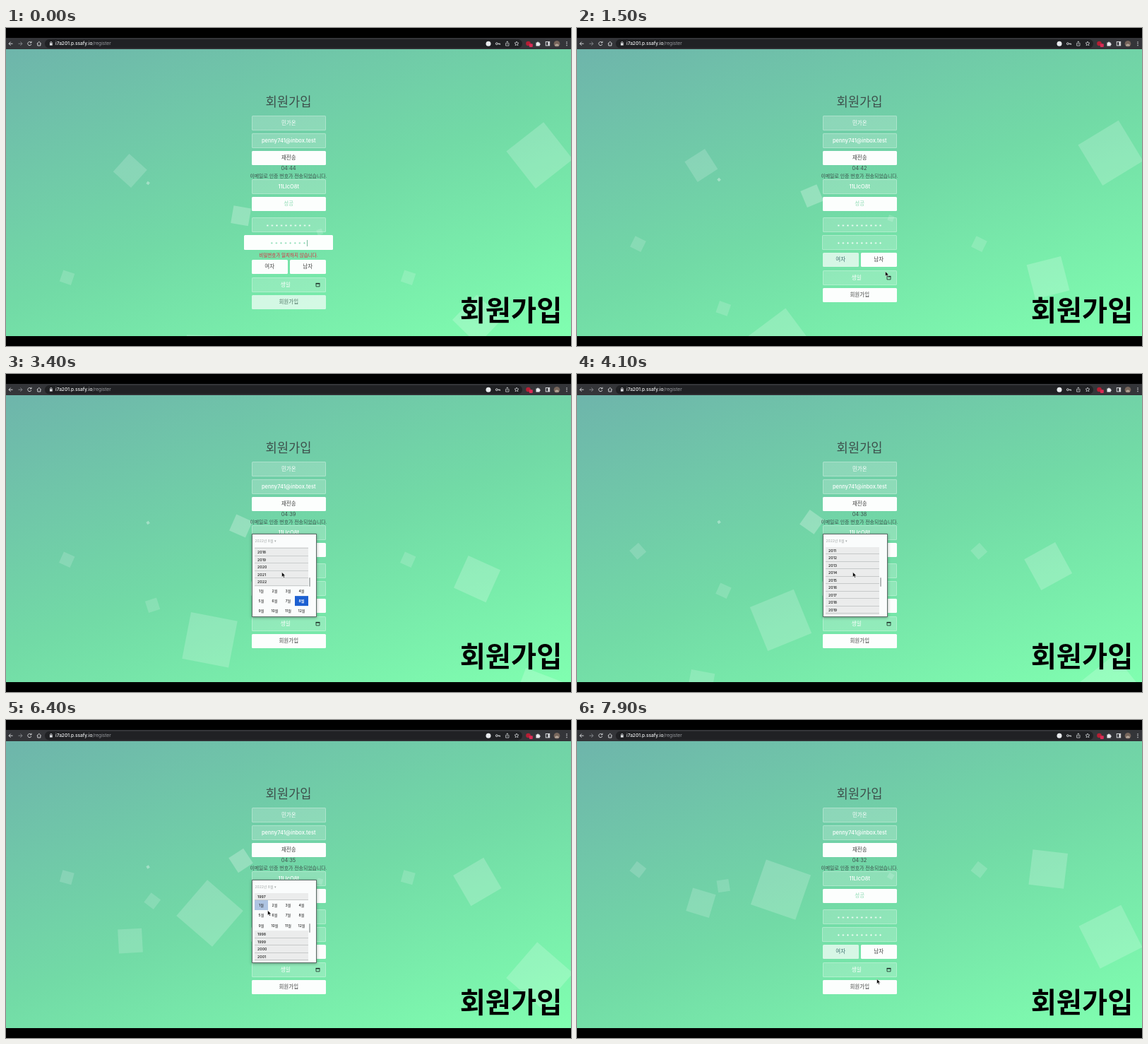
Animation, 800 px wide and 450 px high, one loop 8000 ms. Source, as an HTML page:

```html
<!DOCTYPE html>
<html>
<head>
<meta charset="utf-8">
<title>회원가입</title>
<style>
html, body { margin: 0; width: 100%; height: 100%; overflow: hidden; background: #000; }
body { font-family: Inter, "Noto Sans CJK KR", "Noto Sans CJK", sans-serif; }
#stage { position: relative; width: 800px; height: 450px; overflow: hidden; background: #000; }
#stage div, #cursor, .bar { position: absolute; box-sizing: border-box; white-space: nowrap; }
.bar { left: 0; top: 13.5px; }
.url { left: 70px; top: 17px; font: 6.6px/10px Inter, sans-serif; color: #9a9da1; }
.url b { font-weight: 500; color: #f1f3f4; }
.page { left: 0; top: 29.5px; width: 800px; height: 406.5px; overflow: hidden;
  background: linear-gradient(160deg, #6eb5ab, #72daa6 52%, #80ffb0); }
.form, #lower { left: 0; top: 0; width: 800px; }
.line { left: 300px; width: 200px; text-align: center; color: #3d4f4b; }
.field, .button { left: 347.5px; width: 105.5px; height: 20.8px; border-radius: 1.5px;
  font-size: 7.5px; line-height: 19px; text-align: center; }
.field { color: #fff; font-weight: 500; border: 1px solid rgba(255,255,255,.27); background: rgba(255,255,255,.2); }
.button { height: 20px; line-height: 20px; color: #444; background: #fcfefd; }
.dots { display: inline-block; height: 6.6px; vertical-align: middle;
  background: radial-gradient(circle, currentColor .8px, transparent 1.3px) 0 0 / 6.6px 6.6px; }
#caret { display: inline-block; width: .8px; height: 9px; vertical-align: middle; background: #79b99c; }
.caption { left: 615px; top: 371px; width: 200px; text-align: center; color: #000;
  font: 900 39.3px/52px "Noto Sans CJK KR", "Noto Sans CJK", sans-serif; }
#popup { left: 347.5px; top: 225.5px; width: 92px; height: 118.5px; overflow: hidden;
  background: #fafcfc; border: 1px solid #5b6b66; box-shadow: 0 1px 4px rgba(0,0,0,.35); }
#popup .head { left: 4px; top: 5px; font-size: 5px; line-height: 8px; color: #a3a8a8; }
.view { left: 3.5px; top: 18px; width: 76px; height: 96px; overflow: hidden; }
#list { left: 0; top: 0; width: 76px; }
#list div { position: relative; }
#list .year { height: 10.5px; padding-left: 4px; font: 600 5.2px/10px Inter, sans-serif; color: #333;
  background: #ebecec; border-bottom: .8px solid #c6c9c9; }
#list .months { display: grid; grid-template-columns: repeat(4, 19px); grid-auto-rows: 14.3px; height: 43px; }
#list .months div { font-size: 5.1px; font-weight: 500; line-height: 14.3px; text-align: center; color: #222; }
#list .months .hover { background: #aec4e2; }
#list .months .picked { background: #1d60d1; color: #fff; font-weight: 700; }
.thumb { left: 80.5px; top: 61px; width: 2px; height: 13px; border-radius: 1px; background: #b4b8b8; }
#cursor { left: 0; top: 0; }
</style>
</head>
<body>
<div id="stage">
  <svg class="bar" width="800" height="16" fill="none" stroke="#dfe1e4" stroke-width=".9">
    <rect width="800" height="16" fill="#343539" stroke="none"/>
    <rect x="55" y="2" width="676" height="12.5" rx="6.2" fill="#202124" stroke="none"/>
    <path d="M9.5 8.2H4m2.6-2.6L4 8.2l2.6 2.6"/>
    <path d="M17.5 8.2H23m-2.6-2.6L23 8.2l-2.6 2.6" stroke="#8b8e92"/>
    <path d="M35.5 6.6A2.6 2.6 0 1 0 35.8 9M36 4.8v2.1h-2.1"/>
    <path d="M43.8 8.2l3-2.8 3 2.8M44.8 7.7v3.3h4V7.7"/>
    <path d="M62.6 7.6V6.7a1.2 1.2 0 0 1 2.4 0v.9"/>
    <rect x="61.9" y="7.4" width="3.8" height="3.2" fill="#dfe1e4" stroke="none"/>
    <circle cx="683" cy="8.2" r="3.5" fill="#e8eaed" stroke="none"/>
    <circle cx="694.8" cy="8.2" r="1.4"/><path d="M696.2 8.2h3.4v1.5M698 8.2v1.3"/>
    <path d="M708.5 7.3h-.9v3.8h4.4V7.3h-.9M709.8 9.3V4.9m-1.3 1.2l1.3-1.3 1.3 1.3" stroke-width=".7"/>
    <path d="M723 5l.9 2 2.1.2-1.6 1.4.5 2.1-1.9-1.1-1.9 1.1.5-2.1-1.6-1.4 2.1-.2z" stroke-width=".7"/>
    <circle cx="739.5" cy="8" r="3.3" fill="#b51f34" stroke="none"/>
    <rect x="740.8" y="8.3" width="5" height="4.6" rx="1" fill="#d92b56" stroke="none"/>
    <path d="M750.5 6.4h1.6a1 1 0 0 1 2 0h1.6v1.5a1 1 0 0 1 0 2v1.5h-5.2z" fill="#e8eaed" stroke="none"/>
    <rect x="764.3" y="5.5" width="5.4" height="5.4"/><path d="M768.4 5.5v5.4" stroke-width="2"/>
    <circle cx="780" cy="8.2" r="4.3" fill="#77665c" stroke="none"/>
    <path d="M777.2 11.4a2.8 2.8 0 0 1 5.6 0z" fill="#b4a69a" stroke="none"/>
    <path d="M794 5.2v1.2m0 1.2v1.2m0 1.2v1.2" stroke-width="1.2"/>
  </svg>
  <div class="url"><b>i7a201.p.ssafy.io</b>/register</div>
  <div class="page" id="page"></div>

  <div class="form">
    <div class="line" style="top:91px;font-size:17.7px;line-height:28px;font-weight:500">회원가입</div>
    <div class="field" style="top:124.3px">민가온</div>
    <div class="field" style="top:149px">penny741@inbox.test</div>
    <div class="button" style="top:173.7px">재전송</div>
    <div class="line" id="timer" style="top:193px;font-size:7.4px;line-height:11px"></div>
    <div class="line" style="top:203.5px;font-size:6.9px;line-height:11px">이메일로 인증 번호가 전송되었습니다.</div>
    <div class="field" style="top:214px">11LlcO8t</div>
    <div class="button" style="top:238.8px;color:#8fdcb5">성공</div>
    <div class="field" style="top:268.3px"><span class="dots" style="width:66px"></span></div>
    <div class="field" id="confirm" style="top:293.1px"><span class="dots" id="typed"></span><span id="caret"></span></div>
    <div class="line" id="error" style="top:317px;font-size:6.5px;line-height:10px;color:#e0243c">비밀번호가 일치하지 않습니다.</div>
    <div id="lower">
      <div class="button" id="female" style="top:327.7px;width:51.5px">여자</div>
      <div class="button" style="top:327.7px;left:401.5px;width:51.5px">남자</div>
      <div class="field" style="top:353px;padding-right:9px">생일
        <svg style="position:absolute;left:89.5px;top:6px" width="7" height="7"><path d="M1 1.7h5v4.2H1z" fill="none" stroke="#1c2b26" stroke-width=".8"/><path d="M.6 1.6h5.8" stroke="#1c2b26" stroke-width="1.5"/></svg>
      </div>
      <div class="button" id="submit" style="top:377.8px">회원가입</div>
    </div>
  </div>

  <div id="popup">
    <div class="head">2022년 8월 ▾</div>
    <div class="view"><div id="list"></div></div>
    <div class="thumb"></div>
  </div>
  <div class="caption">회원가입</div>
  <svg id="cursor" width="8" height="10"><path d="M.6.6v6.6l1.6-1.4 1 2.4 1.2-.5-1-2.3h2.1z" fill="#000" stroke="#fff" stroke-width=".45"/></svg>
</div>

<script>
const $ = id => document.getElementById(id);
const LOOP = 8000, STEP = 100, RATE = 1.5, SCALE = 0.419, ROW = 10.5;
const FIRST_YEAR = 1997, LAST_YEAR = 2027;

// left %, size, seconds already run, duration, opacity
const squares = [
  [10, 40, 7.1, 25, .16], [20, 80, 13.25, 17, .17], [25, 40, 3.15, 25, .16],
  [40, 60, 10.25, 22, .25], [70, 40, 7.1, 25, .16], [80, 120, 4.2, 25, .2],
  [32, 160, .15, 25, .19], [55, 20, 17, 40, .16], [25, 10, 30, 40, .35],
  [90, 160, 21.2, 25, .19]
].map(([left, size, phase, duration, alpha]) => {
  const el = $('page').appendChild(document.createElement('div'));
  const side = size * SCALE + 'px';
  Object.assign(el.style, {
    left: left * 8.05 - 2.5 + 'px', bottom: -160 * SCALE + 'px',
    width: side, height: side, background: `rgba(255,255,255,${alpha})`
  });
  const move = el.animate(
    [{ transform: 'translateY(0) rotate(0deg)' },
     { transform: `translateY(${-700 * SCALE}px) rotate(600deg)` }],
    { duration: duration * 1000, easing: 'ease', iterations: Infinity });
  move.pause();
  return { move, phase: phase * 1000 };
});

function addMonths(year) {
  const block = $('list').appendChild(document.createElement('div'));
  block.className = 'months';
  for (let m = 1; m <= 12; m++) {
    const cell = block.appendChild(document.createElement('div'));
    cell.textContent = m + '월';
    if (year === 2022 && m === 8) cell.className = 'picked';
  }
  return block;
}
const months = {};
for (let y = FIRST_YEAR; y <= LAST_YEAR; y++) {
  const row = $('list').appendChild(document.createElement('div'));
  row.className = 'year';
  row.textContent = y;
  if (y === 2022 || y === FIRST_YEAR) months[y] = addMonths(y);
}

// Keys are [time, value...]; values between keys are linear.
function track(keys, t) {
  let i = 1;
  while (i < keys.length - 1 && keys[i][0] < t) i++;
  const a = keys[i - 1], b = keys[i];
  const k = Math.min(1, Math.max(0, (t - a[0]) / (b[0] - a[0])));
  return a.slice(1).map((v, n) => v + (b[n + 1] - v) * k);
}
const pointer = [
  [800, 430, 372], [1000, 378, 333], [1100, 378, 333], [1500, 436, 344], [1700, 440, 352],
  [1900, 440, 352], [2500, 388.5, 263.5], [2900, 388.5, 263.5], [3200, 390, 280],
  [5200, 390, 280], [5600, 370, 249], [5900, 370, 249], [6200, 370, 269], [6500, 370, 269],
  [6800, 362, 262], [7200, 362, 262], [7800, 424, 366]
];
const topYear = [
  [2900, 2022], [3300, 2019], [3700, 2014], [4000, 2011], [4200, 2011], [4600, 2005],
  [4900, 2001], [5100, 2001], [5500, 1997]
];

const show = (el, on) => { el.style.visibility = on ? 'visible' : 'hidden'; };
const between = (t, a, b) => t >= a && t < b;

function draw(t) {
  for (const { move, phase } of squares) move.currentTime = phase + t * RATE;

  const left = Math.floor(284.7 - t * RATE / 1000);
  $('timer').textContent = '04:' + String(left - 240).padStart(2, '0');

  const wrong = t < 400, chosen = t >= 1100;
  const [blur] = track([[1000, 0], [1200, 1]], t);
  const width = 126 - 20.5 * blur;
  Object.assign($('confirm').style, {
    width: width + 'px', left: 400.2 - width / 2 + 'px',
    background: `rgba(255,255,255,${.98 - .78 * blur})`,
    color: blur < .5 ? '#7fd8ad' : '#fff'
  });
  $('typed').style.width = (t < 200 ? 8 : wrong ? 9 : 10) * 6.6 + 'px';
  $('caret').style.display = blur ? 'none' : 'inline-block';
  show($('error'), wrong);
  $('lower').style.top = wrong ? 0 : '-9.7px';

  Object.assign($('female').style, chosen
    ? { background: 'rgba(255,255,255,.7)', color: '#3f7070' }
    : { background: '#fcfefd', color: '#444' });
  Object.assign($('submit').style, chosen
    ? { background: '#fcfefd', color: '#444' }
    : { background: 'rgba(255,255,255,.68)', color: '#4f7565' });

  $('popup').style.display = between(t, 1900, 7200) ? 'block' : 'none';
  const [year] = track(topYear, t);
  months[FIRST_YEAR].style.display = t >= 5800 ? 'grid' : 'none';
  $('list').style.transform = `translateY(${(FIRST_YEAR - year) * ROW}px)`;
  months[2022].children[1].className = between(t, 2500, 3200) ? 'hover' : '';
  months[FIRST_YEAR].children[0].className = t >= 6100 ? 'hover' : '';

  const [x, y] = track(pointer, t);
  $('cursor').style.transform = `translate(${x}px, ${y}px)`;
  show($('cursor'), t >= 800);
}

function tick() {
  draw(Math.floor(performance.now() / STEP) * STEP % LOOP);
  requestAnimationFrame(tick);
}
tick();
</script>
</body>
</html>
```
